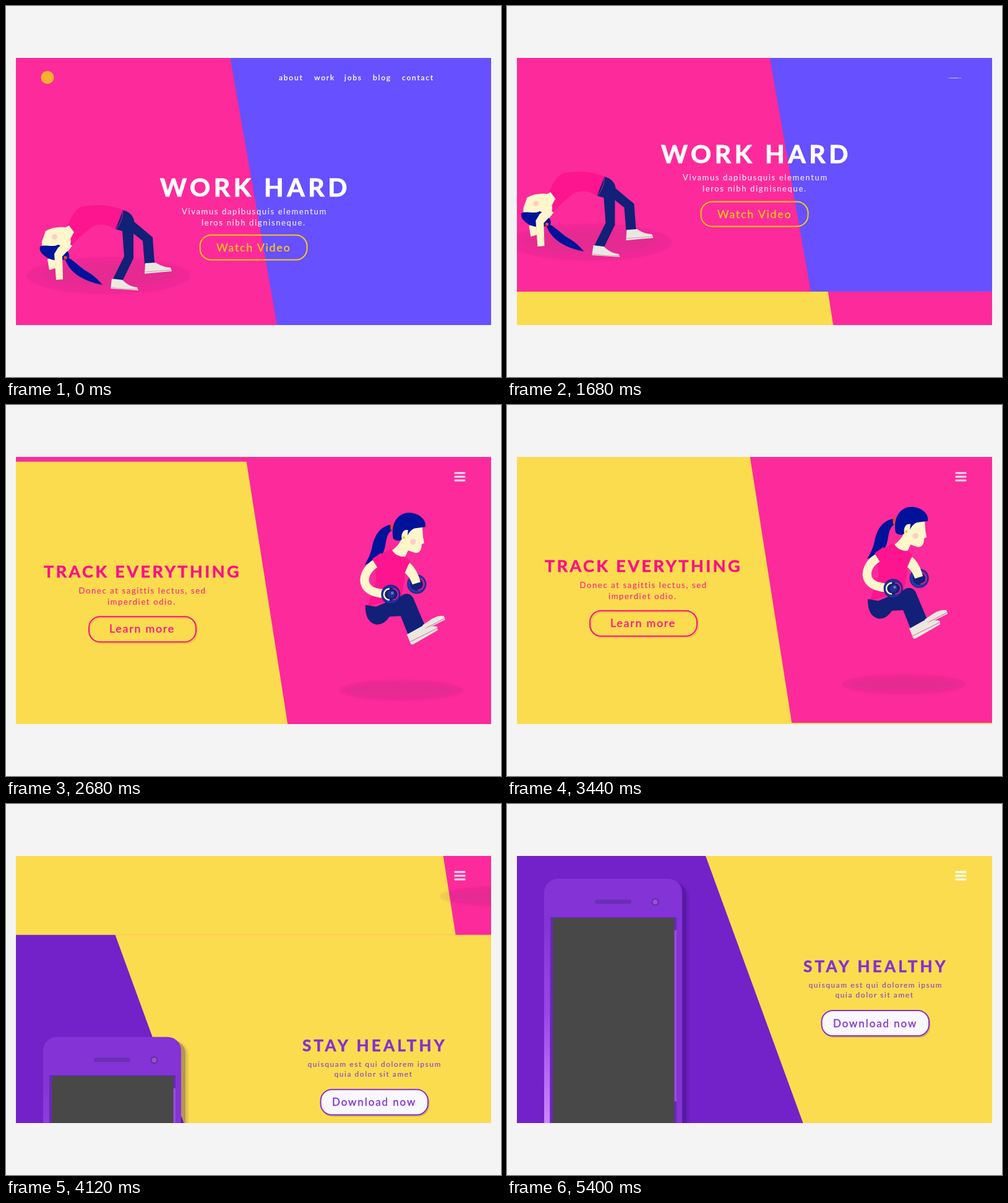
These frames come from a looping animation (800x600 px, 6 s). An HTML page:

```html
<!DOCTYPE html>
<html lang="en">
<head>
<meta charset="utf-8">
<title>Scrolling landing page</title>
<style>
  html, body { margin: 0; width: 100%; height: 100%; overflow: hidden; background: #f4f4f4; }
  svg { display: block; width: 800px; height: 600px; }
  text { font-family: Lato, "Open Sans", sans-serif; white-space: pre;
         fill: currentColor; stroke: currentColor; stroke-width: .3; }
  .big { font-weight: 700; font-size: 41px; letter-spacing: 5.6px; stroke-width: 1; }
  .head { font-weight: 700; font-size: 27px; letter-spacing: 3.45px; stroke-width: .6; }
  .head.short { font-size: 26px; letter-spacing: 4.25px; }
  .sub { font-size: 13px; letter-spacing: 1.65px; opacity: .87; stroke-width: .2; }
  .sub.small { font-size: 12px; letter-spacing: 1.55px; }
  .btn { font-size: 18px; letter-spacing: 1.7px; }
  .btn.small { font-size: 17px; letter-spacing: 1.9px; }
  .nav { font-size: 12px; letter-spacing: 1.8px; }
  .line { fill: none; stroke: currentColor; stroke-width: 2; }
  .pink { fill: #fd2a9b; } .yellow { fill: #fcdc4f; } .blue { fill: #6650ff; } .violet { fill: #7322c9; }
  .skin { fill: #fff6cc; } .hair { fill: #00129a; } .navy { fill: #122077; }
  .shirt { fill: #fc158e; } .shoe { fill: #ece7e1; } .cheek { fill: #fbd0c4; }
  .sole { fill: none; stroke: #b9a7a6; stroke-width: 1; }
  .shade { fill: #5a2a60; opacity: .08; }
</style>
</head>
<body>
<svg viewBox="0 0 800 600">
  <defs>
    <clipPath id="page"><rect x="16" y="84" width="768" height="432"/></clipPath>
    <linearGradient id="glow" x1="0" y1="0" x2="0" y2="1">
      <stop offset="0" stop-color="#8433d6"/><stop offset=".45" stop-color="#9a48e8"/>
      <stop offset="1" stop-color="#d08cff"/>
    </linearGradient>
    <filter id="soft"><feGaussianBlur stdDeviation="1.5"/></filter>
  </defs>
  <g clip-path="url(#page)">

    <g id="slide0">
      <rect class="blue" x="16" y="84" width="768" height="432"/>
      <path id="edge0" class="pink" d="M-600 84H362.400L438 516H-600Z"/>
      <g id="bridge">
        <g filter="url(#soft)">
          <ellipse class="shade" cx="166" cy="436" rx="132" ry="30"/>
          <ellipse class="shade" cx="166" cy="435" rx="108" ry="20"/>
        </g>
        <path class="navy" d="M200 343L237 374L240 415L224 417L221 380L201 364Z"/>
        <path class="shoe" d="M225 416L242 415Q254 423 266 423L268 429L224 433Z"/>
        <path class="sole" d="M225 430L267 427"/>
        <path class="skin" d="M67 410L78 402L80 424L70 427Z"/>
        <path class="skin" d="M58 381L64 364Q78 356 97 358L103 354L110 366L104 376L106 389L96 402Q75 400 58 388Z"/>
        <path class="shirt" d="M189 330C170 321 140 320 121 325C108 332 104 347 99 356L108 367L103 390C115 378 128 366 138 358C152 350 165 354 177 361Z"/>
        <path class="skin" d="M92 361L102 355L110 366L103 376L92 376Z"/>
        <path class="hair" d="M55 389C62 385 76 391 84 386C92 388 105 398 102 407C92 413 76 412 68 408C58 402 53 396 55 389Z"/>
        <path class="hair" d="M95 404C112 412 120 424 132 430C144 437 150 444 156 451C140 448 122 442 110 431C100 422 99 416 95 410Z"/>
        <path class="skin" d="M96 380L107 388L91 405L92 442L81 443L78 401L84 391Z"/>
        <circle cx="96" cy="407" r="2.8" fill="#ef4423"/>
        <circle class="cheek" cx="78.500" cy="373.500" r="4.500"/>
        <path class="navy" d="M189 330Q204 334 207 347L206 361V408L188 445L173 441L191 405L188 364L177 361Z"/>
        <path fill="none" stroke="#fd2a9b" stroke-width=".7" d="M189 331Q189 347 178 361"/>
        <path class="shoe" d="M171 441L188 443Q199 454 212 455L214 460L169 457Z"/>
        <path class="sole" d="M169 455Q190 459 213 458"/>
      </g>
      <circle id="logo" cx="67" cy="115.500" r="10.500" fill="#f9b02c"/>
      <g color="#fff">
        <text class="big" x="249" y="308">WORK HARD</text>
        <text class="sub" x="284" y="336.500">Vivamus dapibusquis elementum</text>
        <text class="sub" x="316" y="354.500">leros nibh dignisneque.</text>
      </g>
      <g color="#fcc916">
        <rect class="line" x="313.500" y="370.500" width="173" height="40" rx="18"/>
        <text class="btn" x="340" y="397">Watch Video</text>
      </g>
    </g>

    <g id="slide1">
      <rect class="pink" x="16" y="84" width="768" height="432"/>
      <path id="edge1" class="yellow" d="M-600 84H390.900L458.700 516H-600Z"/>
      <g id="jumper">
        <g filter="url(#soft)">
          <ellipse class="shade" cx="640" cy="453.500" rx="100" ry="17"/>
          <ellipse class="shade" cx="640" cy="453.500" rx="88" ry="11"/>
        </g>
        <g transform="translate(-.8 1.5)">
          <path class="hair" d="M626 184C608 186 598 200 594 220C591 234 586 242 582 249C592 247 606 240 612 229C618 216 614 202 626 193Z"/>
          <path class="skin" d="M642 188L675 186L676 203L678 214L674 216Q674 230 664 230L652 226L646 239Q634 238 626 226Q637 218 641 208Z"/>
          <path class="hair" d="M628 207C623 182 636 164 655 165C670 166 682 176 680 188L664 190C658 191 654 196 651 202L652 193C644 191 640 200 642 208Q636 213 628 207Z"/>
          <rect x="623.500" y="182" width="3.500" height="11" rx="1" fill="#ef4423"/>
          <circle cx="645" cy="205" r="2" fill="#fcc916"/>
          <circle class="cheek" cx="660" cy="212" r="4.800"/>
          <circle class="navy" cx="666" cy="280.500" r="15.500"/>
          <circle cx="666" cy="280.500" r="12.500" fill="none" stroke="#2438a8" stroke-width="4"/>
          <path d="M668 271A9.500 9.500 0 0 1 668 290" fill="none" stroke="#fc1289" stroke-width="2"/>
          <path class="skin" d="M644 258L655 246Q667 257 672 277L659 281Q655 268 644 260Z"/>
          <path class="shirt" d="M625 224Q632 237 648 236L655 243L647 262Q646 285 640 302L586 317Q592 300 601 275L596 238Z"/>
          <path d="M604 245C584 254 576 273 586 286Q594 295 614 296" fill="none" stroke="#fff6cc" stroke-width="14"/>
          <path class="shirt" d="M608 230L594 240L605 258L622 250Z"/>
          <path class="navy" d="M583 314L600 317L640 300Q652 291 660 302L679 347L652 362L640 332L622 333Q614 346 601 346Q582 342 583 314Z"/>
          <path class="shoe" d="M675 347L690 337Q700 331 710 332L712 338L682 353Z"/>
          <path class="shoe" d="M650 362L677 347L681 353Q690 347 699 349L700 355L660 378Q656 379 655 374Z"/>
          <path d="M655 374L699 352M682 351L711 336" fill="none" stroke="#c24a72" stroke-width=".8"/>
          <circle class="navy" cx="624" cy="297" r="15.500"/>
          <circle cx="624" cy="297" r="12.500" fill="none" stroke="#1f31a2" stroke-width="4"/>
          <path d="M622 288A9 9 0 0 0 622 306" fill="none" stroke="#fff6cc" stroke-width="2.500"/>
          <path d="M627 288A9 9 0 0 1 627 306" fill="none" stroke="#fc1289" stroke-width="1.800"/>
          <circle cx="624.500" cy="297" r="6" fill="#20308e"/>
          <circle cx="626.500" cy="295" r="2.400" fill="#6a72bd"/>
        </g>
      </g>
      <g transform="translate(0 1.500)" color="#fb1089">
        <text class="head" x="61" y="270">TRACK EVERYTHING</text>
        <text class="sub" x="117.500" y="296">Donec at sagittis lectus, sed</text>
        <text class="sub" x="164" y="314">imperdiet odio.</text>
        <rect class="line" x="136" y="335" width="173" height="41" rx="18" color="#b06a20" opacity=".22"/>
        <rect class="line" x="134" y="333" width="173" height="41" rx="18"/>
        <text class="btn" x="167" y="359">Learn more</text>
      </g>
    </g>

    <g id="slide2">
      <rect class="yellow" x="16" y="84" width="768" height="432"/>
      <path id="edge2" class="violet" d="M-600 84H321L478.500 516H-600Z"/>
      <g id="phone">
        <g fill="#2c0a60">
          <rect x="80" y="128" width="214" height="460" rx="22" opacity=".14" filter="url(#soft)"/>
          <rect x="80" y="126" width="210" height="460" rx="22" opacity=".22"/>
        </g>
        <rect x="60" y="121" width="223" height="460" rx="22" fill="#8433d6"/>
        <rect x="60" y="190" width="9" height="340" fill="url(#glow)"/>
        <rect x="70" y="183" width="204" height="360" fill="#6a27b8"/>
        <rect x="270" y="204" width="4" height="277" fill="#964fdc"/>
        <rect x="74" y="184" width="196.500" height="360" fill="#484848"/>
        <rect x="142" y="154.500" width="59" height="7" rx="3.500" fill="#6c2db7"/>
        <circle cx="239.500" cy="158.500" r="5" fill="#9554c8" stroke="#6429aa" stroke-width="2"/>
      </g>
      <g color="#8431d2">
        <text class="head short" x="479" y="272">STAY HEALTHY</text>
        <text class="sub small" x="487.500" y="297">quisquam est qui dolorem ipsum</text>
        <text class="sub small" x="530.500" y="313">quia dolor sit amet</text>
        <rect x="509.500" y="335.500" width="175" height="42.500" rx="19" fill="#7a5010" opacity=".25"/>
        <rect x="508.500" y="334" width="173.500" height="41" rx="18" fill="#f9f7ff" stroke="#8431d2" stroke-width="2"/>
        <text class="btn small" x="527" y="360.500">Download now</text>
      </g>
    </g>

    <g id="nav" color="#fff"></g>
    <g id="bars" fill="#fff">
      <rect x="-9" y="-7.500" width="18" height="3" rx="1"/>
      <rect x="-9" y="-1.500" width="18" height="3" rx="1"/>
      <rect x="-9" y="4.500" width="18" height="3" rx="1"/>
    </g>
  </g>
</svg>
<script>
  const el = id => document.getElementById(id);
  const move = (id, x, y = 0) => el(id).setAttribute('transform', `translate(${x} ${y})`);
  const clamp = v => Math.min(1, Math.max(0, v));
  const LOOP = 6000, STEP = 40, PAGE = 432, MENU_X = 733.5, MENU_Y = 116;

  // cubic-bezier(1/3, 0, 1/3, 1), solved by bisection
  function ease(v) {
    const x = clamp(v);
    if (x === 0 || x === 1) return x;
    let lo = 0, hi = 1;
    for (let i = 0; i < 24; i++) {
      const s = (lo + hi) / 2;
      if (s - s * s + s * s * s < x) lo = s; else hi = s;
    }
    return lo * lo * (3 - 2 * lo);
  }
  const tween = (t, start, length) => ease((t - start) / length);

  const links = [['about', 441, 461], ['work', 498, 514.5], ['jobs', 547, 561.5],
                 ['blog', 593, 608], ['contact', 640, 665]].map(([word, left, mid]) => {
    const node = document.createElementNS('http://www.w3.org/2000/svg', 'text');
    node.textContent = word;
    node.setAttribute('class', 'nav');
    node.setAttribute('x', left - mid);
    node.setAttribute('y', 4);
    el('nav').append(node);
    return { node, mid };
  });

  function draw(t) {
    const first = PAGE * tween(t, 1407, 1491);
    const second = PAGE * tween(t, 3386, 1491);
    for (let i = 0; i < 3; i++) move('slide' + i, 0, i * PAGE - first - second);

    // slanted edges slide sideways as the page scrolls, figures follow more slowly
    move('edge0', first * .98);
    move('bridge', -first * .584);

    const dip = 8.5 * Math.sin(Math.PI * clamp((t - 1400) / 1600));
    const shift = (PAGE - first) * .35 - dip + second * .881;
    move('edge1', shift);
    move('jumper', shift * .6);

    const rest = 1 - tween(t, 3386, 1860);
    move('edge2', -313 * rest);
    move('phone', 0, 277 * rest);

    // navigation folds into the menu icon
    const fold = tween(t, 1000, 917);
    const open = tween(t, 1690, 280);
    for (const { node, mid } of links) {
      const x = mid + (MENU_X - mid) * fold;
      node.setAttribute('transform', `translate(${x} ${MENU_Y}) scale(${1 - .86 * fold})`);
    }
    el('nav').setAttribute('opacity', 1 - open);
    el('logo').setAttribute('opacity', 1 - clamp((t - 1020) / 400));
    el('bars').setAttribute('transform', `translate(${MENU_X} ${MENU_Y}) scale(${open} 1)`);
    el('bars').setAttribute('opacity', t < 4400 ? .85 : 1);
  }

  function tick(now) {
    const t = now % LOOP;
    draw(t - t % STEP);
    requestAnimationFrame(tick);
  }
  tick(performance.now());
</script>
</body>
</html>
```
